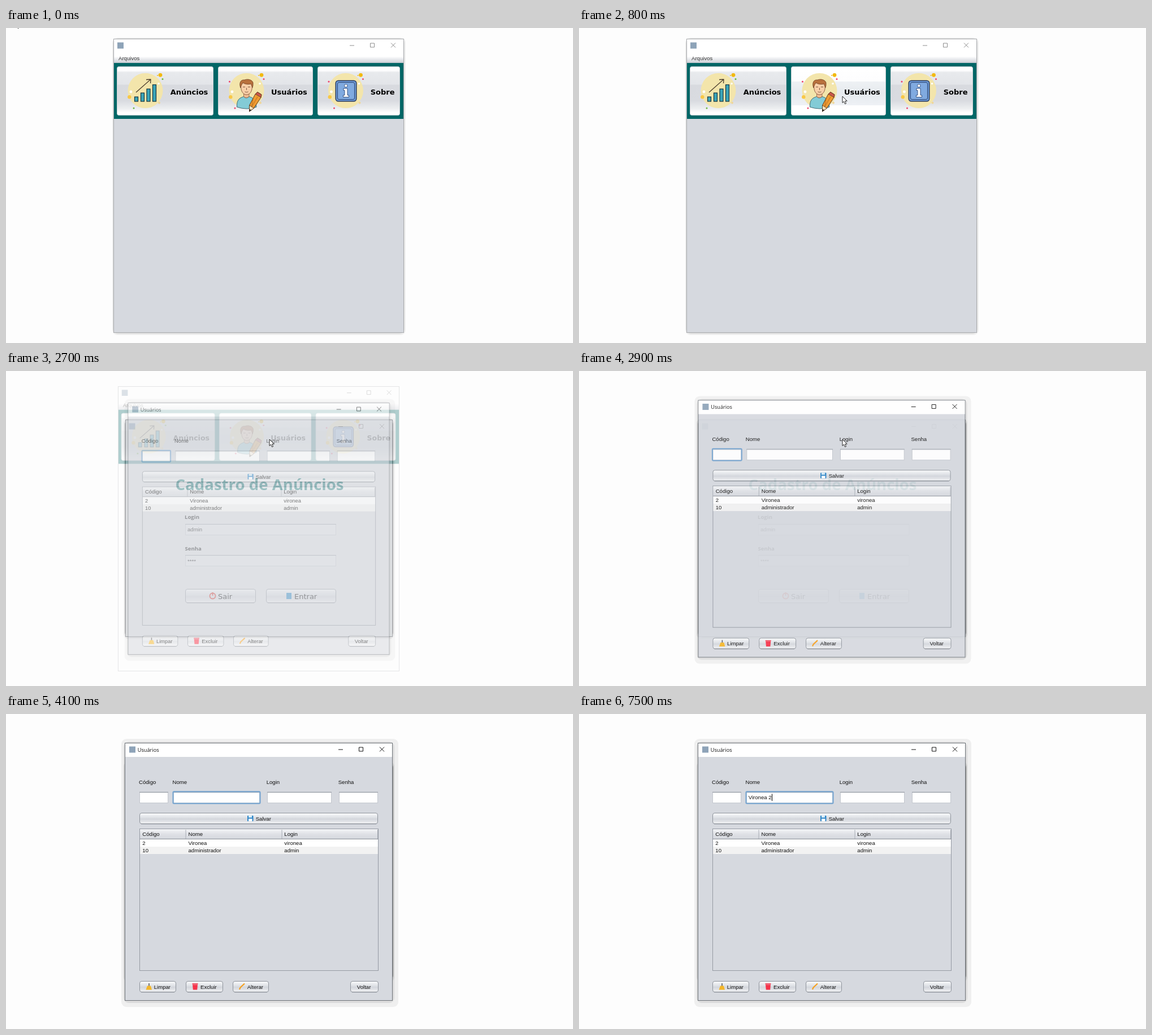
An HTML page that plays this animation: 1003x558 px, repeating every 8000 ms.

```html
<!DOCTYPE html>
<html lang="pt">
<head>
<meta charset="utf-8">
<style>
html, body { margin: 0; width: 100%; height: 100%; overflow: hidden; background: #fdfdfd }
svg { display: block; font: 9.6px "Liberation Sans", sans-serif; white-space: pre }
.big { font: bold 13px "DejaVu Sans", sans-serif }
.mid { font: 13px "DejaVu Sans", sans-serif }
.ui { font: 9.2px "Open Sans", sans-serif }
.label { font: bold 9.6px "Open Sans", sans-serif }
.title { font: bold 27.6px "Open Sans", sans-serif }
</style>
</head>
<body>
<svg id="stage" width="1003" height="558" viewBox="0 0 1003 558"></svg>
<script>
const PANEL = '#d6d9df', USER = 'Vironea';

// Markup helpers
const rect = (x, y, w, h, fill, more = '') =>
  `<rect x="${x}" y="${y}" width="${w}" height="${h}" fill="${fill}" ${more}/>`;
const dot = (x, y, r, fill) => `<circle cx="${x}" cy="${y}" r="${r}" fill="${fill}"/>`;
const path = (d, fill = 'none', stroke = 'none', width = 1) =>
  `<path d="${d}" fill="${fill}" stroke="${stroke}" stroke-width="${width}" stroke-linejoin="round"/>`;
const text = (x, y, s, cls = '', fill = '#111') =>
  `<text x="${x}" y="${y}" class="${cls}" fill="${fill}">${s}</text>`;
const group = (id, ...parts) => `<g id="${id}">${parts.join('')}</g>`;
const gradient = (id, ...stops) => `<linearGradient id="${id}" x2="0" y2="1">` +
  stops.map(([at, c]) => `<stop offset="${at}" stop-color="${c}"/>`).join('') + '</linearGradient>';

const controls = (x, y) => path(
  `M${x} ${y + .5}h8M${x + 36.5} ${y - 3.5}h7v7h-7zM${x + 73} ${y - 4}l8 8m0-8l-8 8`, 'none', 'currentColor');
const halo = (x, y, w, h, alpha) => rect(x, y, w, h, '#000', `fill-opacity="${alpha}" rx="9"`);
const appIcon = (x, y) => rect(x, y, 11, 11, '#8ea3b8');
const button = (x, y, w, h) => rect(x + .5, y + .5, w - 1, h - 1, 'url(#metal)', 'stroke="#8f949c" rx="3.5"') +
  path(`M${x + 3} ${y + h - .3}h${w - 6}`, 'none', '#777c84', .8);
const field = (x, y, w, h, fill = '#fff') => rect(x + .5, y + .5, w - 1, h - 1, fill, 'stroke="#c3c7ce"') +
  path(`M${x} ${y + .5}h${w}`, 'none', '#9499a1') + path(`M${x + 1} ${y + 1.5}h${w - 2}`, 'none', '#e2e4e8');
const ring = (id, x, w) =>
  rect(x, 137.5, w, 21, 'none', `id="${id}" stroke="#73a4d1" stroke-width="2" rx="1.5"`);

// Round backdrop with confetti shared by the three toolbar icons
const badge = (dx, accent, extra = '') => `<g transform="translate(${dx})">` + dot(246.5, 111, 31, '#f3e5ab') +
  dot(273, 83.3, 3.4, '#f2b90f') + dot(268, 84, 1, '#f2b90f') + dot(218.3, 122.3, 3.2, '#f9c846') +
  dot(271, 132.5, 2, '#efd79b') + dot(221, 113, 2.4, '#fff') + dot(270, 98.5, 1.8, '#fff') +
  dot(277, 90.5, 1.5, accent) + dot(226, 142, 1.5, accent) + extra + '</g>';
const pinkBadge = dx => badge(dx, '#f0456a', dot(216.5, 95, 1.6, '#f0456a'));

const chartIcon = [[227, 122, 7], [238, 115, 7], [248.5, 108, 7], [259, 100.5, 7]]
  .map(([x, y, w]) => rect(x + .5, y, w - 1, 130 - y, '#3aa5b9', 'stroke="#17343f" stroke-width="1.2"')).join('') +
  path('M230 114L256 91M248 91.5L256 91L255.5 98', 'none', '#4a3b2c', 1.3);

const personIcon =
  path('M408.5 140C408 128 412 124 420.5 121.5Q425 126 430 121.5C438 124 442 127 443 140Q426 146 408.5 140Z', '#83cbd6', '#35606b', .9) +
  path('M420.5 114V121.5Q425 126 430 121.5V114Z', '#eebb92', '#7b4a30', .7) +
  path('M415.5 100C415 112 419 118 425.5 118C432 118 436 112 435.5 100L430 95H420Z', '#f8cfa8', '#7b4a30', .8) +
  path('M414.8 106C412 97 415 91 422 92C428 89.500 436 92 437 97Q437.500 102 435.800 106L433.500 99Q425 101 419 97Q416.500 100 414.800 106Z', '#b9713d', '#6b3b20', .8) +
  path('M419 104.500h4M428 104.500h4M425.500 106v4M422.500 113q3 1.500 6 0', 'none', '#633d2a', .8) +
  path('M441 117L445 113.500L452 118L451 123L438.500 142L430.500 148L430.500 137Z', '#ef9b32', '#5b3a1e', 1) +
  path('M430.500 137L438.500 142L430.500 148Z', '#f7dfb8', '#5b3a1e', .9) +
  path('M430.500 148V143.500L434 145.500Z', '#222') + path('M441 117L451 123L452 118L445 113.500Z', '#c9574c', '#5b3a1e', .8) +
  path('M437.500 123L434.500 139.500M445 122L434.500 139.500', 'none', '#a8631c', .8);

const infoIcon = rect(583.2, 93.2, 36.6, 36.6, '#6c98d4', 'rx="4.5" stroke="#22365e" stroke-width="1.4"') +
  rect(586.5, 96.500, 30, 30, '#80aae0', 'rx="2.5" stroke="#2c4776"') +
  path('M597 107H604V119H606.500V122.500H596.500V119H599V110.500H597Z', '#fff', '#2c4776', .9) +
  `<circle cx="601.300" cy="102.300" r="2.700" fill="#fff" stroke="#2c4776" stroke-width=".9"/>`;

const tile = (id, x, w) => rect(x + .5, 68.5, w - 1, 86, 'url(#tile)', `id="${id}" rx="3" stroke="#c9ced3"`);

const mainWindow = group('main',
  group('mainHalo'),
  rect(190.5, 19.5, 513, 520, '#fff', 'id="mainFrame"'),
  appIcon(197, 25.500), group('mainControls', controls(608, 30.500)),
  rect(191, 51, 512, 11, 'url(#menu)'), text(199, 56.700, 'Arquivos', '', '#333'),
  rect(191, 62, 512, 99, '#006666'), rect(191, 161, 512, 378, PANEL, 'id="mainBody"'),
  tile('tile0', 196, 171), tile('tile1', 375, 168), tile('tile2', 551, 146),
  badge(0, '#6cb83c'), chartIcon, pinkBadge(179), personIcon, pinkBadge(354.500), infoIcon,
  text(290.700, 118, 'Anúncios', 'big', '#000'), text(469, 118, 'Usuários', 'big', '#000'),
  text(644.700, 118, 'Sobre', 'big', '#000'));

const loginWindow = group('login',
  halo(208, 84, 479, 391, .07), halo(210, 86, 475, 386, .3),
  rect(211.500, 86.500, 472, 384, '#e0e3e6', 'stroke="#85898e"'),
  appIcon(217.500, 92.500), `<g color="#888">${controls(588, 98)}</g>`,
  text(299.500, 211, 'Cadastro de Anúncios', 'title', '#006666'),
  text(316, 261.500, 'Login', 'label'), field(317, 271, 267, 20, '#e6e8ec'), text(321, 284.300, 'admin'),
  text(316.500, 318, 'Senha', 'label'), field(317, 326, 267, 20, '#e6e8ec'), text(321, 340, '****'),
  button(317, 386, 125, 25), `<circle cx="365.500" cy="398.500" r="5" fill="none" stroke="#d9261c" stroke-width="1.800"/>`,
  path('M365.500 392v6', 'none', '#d9261c', 1.800), text(375, 403.500, 'Sair', 'mid', '#000'),
  button(460, 386, 124, 25), rect(496, 393, 9, 11, '#1b83c5'), text(510, 403.500, 'Entrar', 'mid', '#000'));

const row = (y, ...cells) => cells.map((s, i) => text([241.300, 322.500, 492.300][i], y, s)).join('');

const usersWindow = group('users',
  halo(204, 44, 490, 475, .055), halo(208, 49, 479, 463, .08),
  rect(210.500, 51.500, 473, 456, PANEL, 'stroke="#6d7278"'), rect(211, 52, 472, 24, '#fff'),
  appIcon(218, 57.500), text(232.800, 67, 'Usuários', 'ui'), `<g color="#111">${controls(588, 62.500)}</g>`,
  text(235, 123.700, 'Código'), text(294.500, 123.700, 'Nome'), text(460.700, 123.700, 'Login'), text(587.700, 123.700, 'Senha'),
  field(236, 138, 51, 20), field(296, 138, 153, 20), field(462, 138, 114, 20), field(589, 138, 69, 20),
  ring('codeRing', 235.500, 52), ring('nameRing', 295.500, 154),
  '<text id="typed" x="299.700" y="151.300" fill="#111"></text>', rect(300, 141.500, 1, 12.500, '#000', 'id="caret"'),
  button(236, 175, 422, 20), rect(427, 180, 10.500, 10, '#2f86c8', 'rx="1"'), rect(429, 180, 6, 3.500, '#d9edf8'),
  rect(429, 185.500, 6.500, 4.500, '#fff'), text(441.700, 189, 'Salvar'),
  rect(236.500, 203.500, 422, 251, PANEL, 'stroke="#959aa3"'), rect(237, 204, 421, 17.500, 'url(#head)'),
  path('M237 221.500h421', 'none', '#8b9098'), path('M318 205v16M488 205v16M657.500 205v16', 'none', '#a9aeb6'),
  rect(237, 222, 421, 13, '#fff'), rect(237, 235, 421, 13, '#f2f2f2'),
  row(215.700, 'Código', 'Nome', 'Login'), row(232, '2', USER, USER.toLowerCase()), row(245.300, '10', 'administrador', 'admin'),
  button(236, 473, 65, 20), path('M253 477v5', 'none', '#555', 1.500),
  path('M250 481.500h6l2 7h-10.500z', '#f4b629'), text(261.700, 486.500, 'Limpar'),
  button(318, 473, 66, 20), path('M330 479.500h9l-.8 9h-7.400z', '#f5334a'), rect(329.500, 477.300, 10, 1.700, '#f5334a'),
  text(344, 486.500, 'Excluir'),
  button(401, 473, 64, 20), path('M413 488l1.500-3.500L422 477.500', 'none', '#f5a020', 2.200), text(426.700, 486.500, 'Alterar'),
  button(609, 473, 50, 20), text(620.800, 486.500, 'Voltar'));

stage.innerHTML = '<defs>' +
  gradient('tile', [0, '#fff'], [.09, '#fcfcfd'], [.1, '#f0f1f3'], [.12, '#e8eaed'], [.36, '#e3e5e9'], [.38, '#d8dadf'],
    [.7, '#d9dbe0'], [.86, '#eceef0'], [.95, '#fff']) +
  gradient('hover', [0, '#fff'], [.3, '#fdfdfe'], [.31, '#eef1f4'], [.55, '#e6eaee'], [.79, '#eef1f5'], [.8, '#fff']) +
  gradient('press', [0, '#c4c8d0'], [.16, '#bcc0c9'], [.18, '#b3b7c1'], [.36, '#adb1bc'], [.38, '#a4a8b4'], [.78, '#a9adb9'], [1, '#bfc3cb']) +
  gradient('metal', [0, '#fafbfc'], [.45, '#dcdfe4'], [.55, '#d3d6dc'], [1, '#f1f2f4']) +
  gradient('head', [0, '#f4f5f7'], [.5, '#dfe1e6'], [1, '#d4d7dd']) +
  gradient('menu', [0, '#fcfcfd'], [.5, '#e3e5e9'], [.9, '#d0d3d9'], [1, '#a9b4b9']) + '</defs>' +
  loginWindow + mainWindow + usersWindow +
  `<g id="pointer">${path('M.5 .5V12L3 9.600L5 14L7 13.200L5.200 8.800H8.700Z', '#fff', '#111', .9)}</g>`;

const $ = id => document.getElementById(id);
const set = (id, attrs) => { for (const k in attrs) $(id).setAttribute(k, attrs[k]); };
const show = (id, on) => set(id, { visibility: on ? 'visible' : 'hidden' });
const zoom = k => `translate(447 279) scale(${k}) translate(-447 -279)`;

// Entries are [start time, value...]; the last one started is current
const at = (track, t) => track.findLast(step => step[0] <= t);
const pointerTrack = [[0, 16, -13.500], [200, 120, 24], [300, 300, 92], [400, 490, 155], [500, 605, 191],
  [600, 560, 172], [700, 492, 137], [800, 465.500, 120.500], [3200, 446, 131], [3300, 395, 152],
  [3400, 345, 158], [3500, -50, -50]];
const typeTrack = [[0, 0], [5600, 1], [6000, 2], [6100, 3], [6300, 4], [6400, 5], [6500, 6], [6700, 7], [7400, 8], [7500, 9]];
const caretTrack = [[0, 0], [3600, 1], [4100, 0], [4700, 1], [5100, 0], [5600, 1], [7200, 0], [7400, 1]];
const fadeTrack = [[0, 1, 1, 0, 1], [2700, .3, .969, .5, .977], [2900, 0, 1, .92, .998], [3000, 0, 1, 1, 1]];
const tiles = [[196, 367], [375, 543], [551, 697]];

function draw(t) {
  const [, px, py] = at(pointerTrack, t);
  set('pointer', { transform: `translate(${px} ${py})` });

  const [, mainAlpha, mainZoom, usersAlpha, usersZoom] = at(fadeTrack, t);
  const fading = t >= 2700, active = t >= 2500 && !fading;
  set('main', { opacity: mainAlpha, transform: zoom(mainZoom) });
  set('users', { opacity: usersAlpha, transform: zoom(usersZoom) });
  show('login', fading);
  show('mainHalo', !fading);
  $('mainHalo').innerHTML = active ? halo(186, 16, 525, 532, .1)
    : halo(188, 17, 519, 527, .05) + halo(189, 18, 516, 524, .07);
  set('mainFrame', { stroke: active ? '#62676d' : '#a9abae' });
  set('mainControls', { color: active ? '#111' : '#8c8c8c' });
  set('mainBody', { fill: fading ? '#fff' : PANEL });
  tiles.forEach(([left, right], i) => {
    const over = px > left && px < right && py > 68 && py < 155, down = over && active;
    set('tile' + i, { fill: `url(#${down ? 'press' : over ? 'hover' : 'tile'})`,
      stroke: down ? '#263750' : '#c9ced3',
      style: down ? 'outline:1px solid #73a4d1;outline-offset:0' : '' });
  });

  const focused = t >= 3600, typed = (USER + ' 2').slice(0, at(typeTrack, t)[1]);
  show('codeRing', !focused);
  show('nameRing', focused);
  $('typed').textContent = typed;
  const width = typed ? $('typed').getComputedTextLength() : 0;
  set('caret', { x: Math.round(299.700 + width) });
  show('caret', at(caretTrack, t)[1]);
}

function frame() {
  draw(performance.now() % 8000);
  requestAnimationFrame(frame);
}
frame();
</script>
</body>
</html>
```
